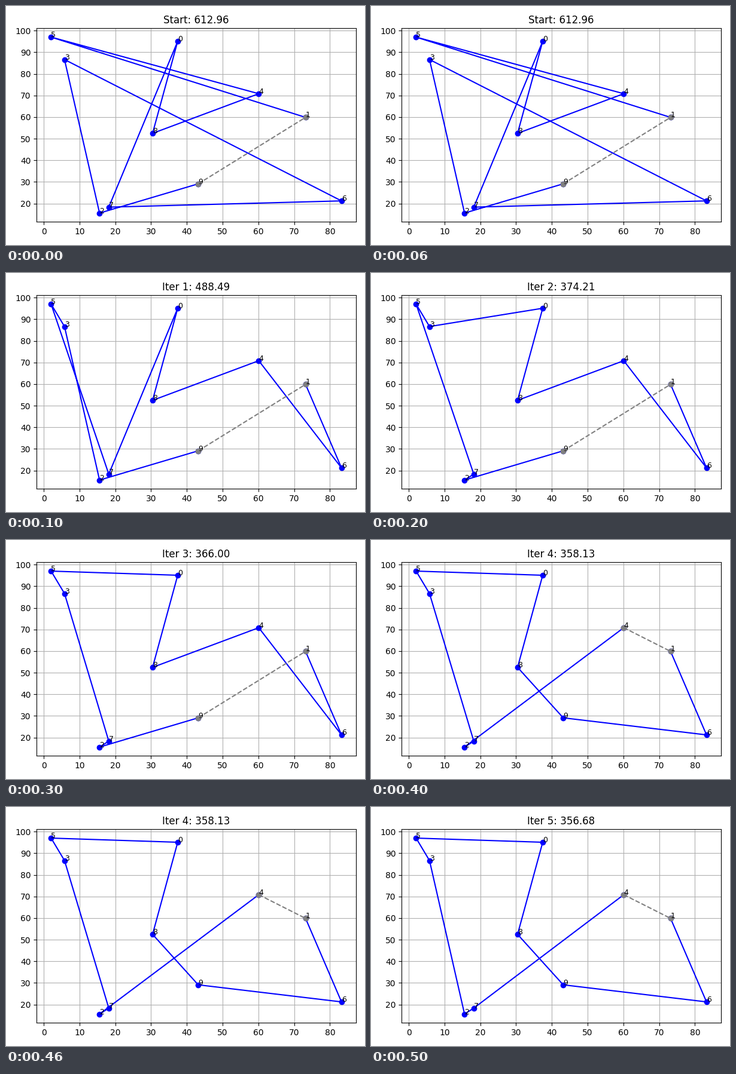
Write a matplotlib script that moves like this. It is 600 px wide and 400 px high and loops after 0.6 s.

```python
import matplotlib.pyplot as plt
import numpy as np
from matplotlib.animation import FuncAnimation

FIRST_TOUR = [1, 5, 4, 8, 0, 7, 6, 3, 2, 9]
SWAPS = [(5, 6), (7, 3), (5, 3), (4, 9), (7, 2)]  # cities exchanged at each iteration

cities = np.random.RandomState(42).rand(10, 2) * 100


def swap(tour, a, b):
    exchange = {a: b, b: a}
    return [exchange.get(city, city) for city in tour]


def tour_length(tour):
    points = cities[tour]
    return np.linalg.norm(points - np.roll(points, -1, axis=0), axis=1).sum()


tours = [FIRST_TOUR]
for pair in SWAPS:
    tours.append(swap(tours[-1], *pair))

fig, ax = plt.subplots(figsize=(6, 4), dpi=100)
path, = ax.plot(*cities[FIRST_TOUR].T, "o-", color="blue")
closing, = ax.plot(*cities[[FIRST_TOUR[-1], FIRST_TOUR[0]]].T, "o--", color="gray")
for number, (x, y) in enumerate(cities):
    ax.text(x, y, str(number), fontsize=9)
title = ax.set_title("Start: 612.96")
ax.grid(True)
fig.tight_layout()


def update(step):
    tour = tours[step]
    path.set_data(*cities[tour].T)
    closing.set_data(*cities[[tour[-1], tour[0]]].T)
    name = f"Iter {step}" if step else "Start"
    title.set_text(f"{name}: {tour_length(tour):.2f}")
    return path, closing, title


anim = FuncAnimation(fig, update, frames=len(tours), interval=100, repeat=True)
plt.show()
```
